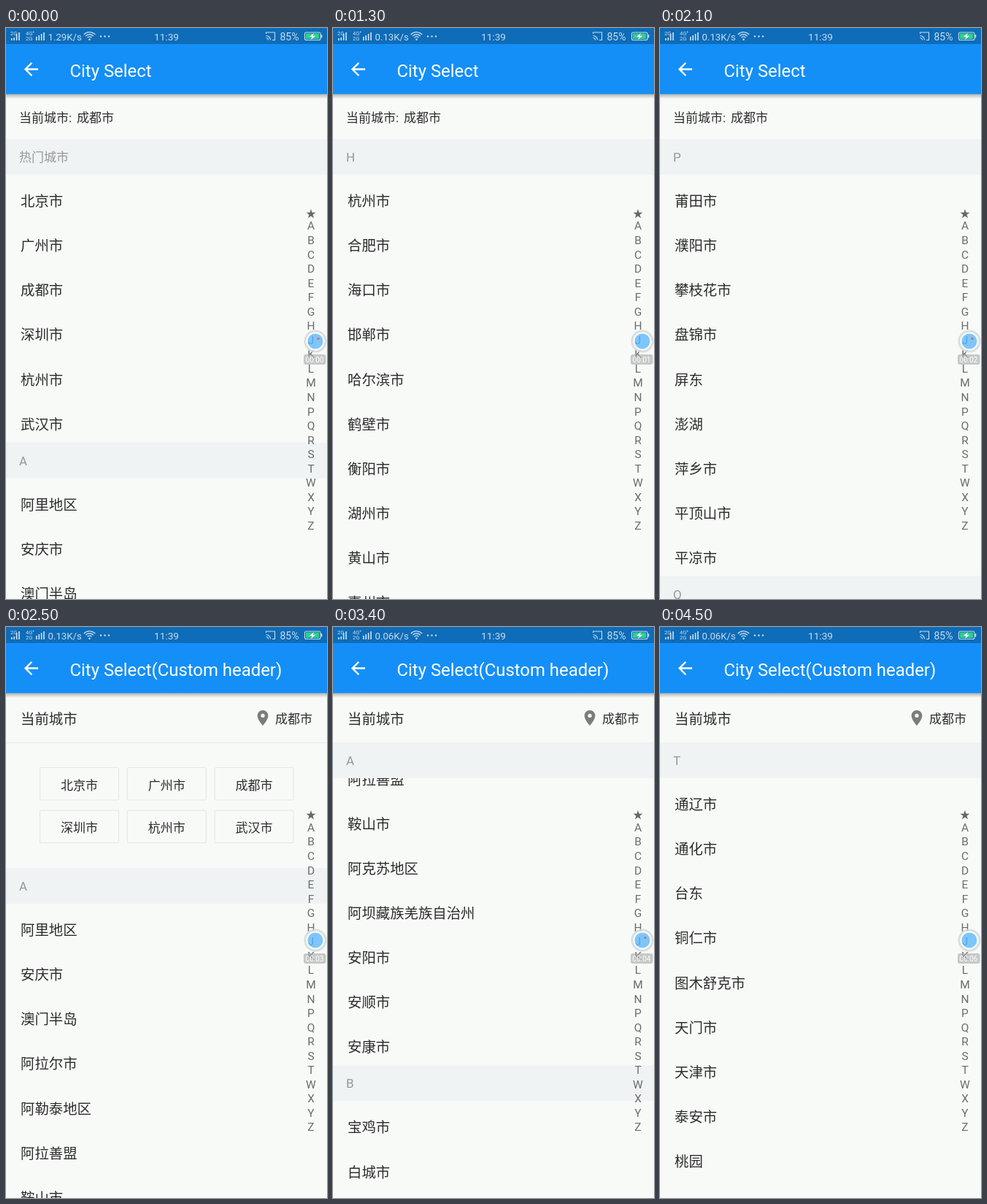
Animation of 440x782 px, one loop 4.6 s. Source, as an HTML page with a canvas:

```html
<!DOCTYPE html>
<html lang="zh">
<head>
<meta charset="utf-8">
<style>
html, body { margin: 0; width: 100%; height: 100%; overflow: hidden; background: #f8faf8; }
canvas { display: block; }
</style>
</head>
<body>
<canvas id="stage" width="440" height="782"></canvas>
<script>
const c = document.getElementById('stage').getContext('2d');
const LOOP = 4600, STEP = 100, HEAD = 49, ROW = 61.1, GRID = 172;
const BG = '#f8faf8', INK = '#2c2c2c';

const sections = `★ 北京市 广州市 成都市 深圳市 杭州市 武汉市
A 阿里地区 安庆市 澳门半岛 阿拉尔市 阿勒泰地区 阿拉善盟 鞍山市 阿克苏地区 阿坝藏族羌族自治州 安阳市 安顺市 安康市
B 宝鸡市 白城市 百色市 白山市 保定市 蚌埠市 包头市 北海市 本溪市 滨州市 亳州市
C 长沙市 长春市 常州市 成都市 承德市 赤峰市 滁州市 潮州市 郴州市 沧州市
D 大连市 大庆市 大同市 丹东市 德阳市 德州市 东莞市 东营市 定西市 达州市
E 鄂尔多斯市 鄂州市 恩施土家族苗族自治州
F 福州市 佛山市 抚顺市 抚州市 阜新市 阜阳市 防城港市
G 广州市 广元市 广安市 贵阳市 贵港市 桂林市 赣州市 高雄市 固原市
H 杭州市 合肥市 海口市 邯郸市 哈尔滨市 鹤壁市 衡阳市 湖州市 黄山市 惠州市
J 济南市 吉林市 嘉兴市 江门市 金华市 锦州市 九江市 荆州市 揭阳市 焦作市
K 昆明市 开封市 克拉玛依市 喀什地区
L 兰州市 拉萨市 洛阳市 柳州市 乐山市 丽江市 连云港市 临沂市 六安市 龙岩市
M 绵阳市 眉山市 茂名市 梅州市 牡丹江市 马鞍山市 苗栗
N 南京市 南宁市 南昌市 南通市 南阳市 宁波市 宁德市 内江市 南投
P 莆田市 濮阳市 攀枝花市 盘锦市 屏东 澎湖 萍乡市 平顶山市 平凉市
Q 青岛市 泉州市 秦皇岛市 衢州市 清远市 曲靖市 钦州市 庆阳市 潜江市
R 日照市 日喀则市
S 上海市 深圳市 苏州市 沈阳市 石家庄市 绍兴市 汕头市 三亚市 韶关市 宿迁市
T 通辽市 通化市 台东 铜仁市 图木舒克市 天门市 天津市 泰安市 桃园 铜川市 唐山市 台州市
W 武汉市 无锡市 温州市 潍坊市 威海市 芜湖市 梧州市 渭南市 文山市 乌海市
X 西安市 厦门市 徐州市 襄阳市 咸阳市 湘潭市 新乡市 信阳市 孝感市 邢台市
Y 银川市 宜昌市 烟台市 扬州市 盐城市 岳阳市 宜宾市 玉林市 榆林市 运城市
Z 郑州市 珠海市 中山市 湛江市 肇庆市 株洲市 淄博市 张家口市 镇江市 遵义市`
  .split('\n').map(line => {
    const [key, ...cities] = line.split(' ');
    return { key, cities };
  });

const pinIcon = new Path2D('M12 2C8.13 2 5 5.13 5 9c0 5.25 7 13 7 13s7-7.75 7-13c0-3.87-3.13-7-7-7zm0 9.5a2.5 2.5 0 0 1 0-5 2.5 2.5 0 0 1 0 5z');
const backIcon = new Path2D('M20 11H7.83l5.59-5.59L12 4l-8 8 8 8 1.41-1.41L7.83 13H20v-2z');
const boltIcon = new Path2D('M422 7l-6 5h3.6l-1.4 4 6-5.2h-3.6z');

// cy is the optical middle of the glyphs
function text(str, x, cy, size, color = INK, align = 'left') {
  c.font = `400 ${size}px Roboto, "Noto Sans CJK SC", "Noto Sans CJK", sans-serif`;
  c.fillStyle = color;
  c.textAlign = align;
  c.fillText(str, x, cy + size * 0.37);
}

function rect(x, y, w, h, color) {
  c.fillStyle = color;
  c.fillRect(x, y, w, h);
}

function disc(x, y, r, color) {
  c.fillStyle = color;
  c.beginPath();
  c.arc(x, y, r, 0, 7);
  c.fill();
}

function ring(x, y, r, width, color) {
  c.strokeStyle = color;
  c.lineWidth = width;
  c.beginPath();
  c.arc(x, y, r, 0, 7);
  c.stroke();
}

function box(x, y, w, h, r) {
  c.beginPath();
  c.roundRect(x, y, w, h, r);
}

function icon(path, x, y, scale, color) {
  c.save();
  c.translate(x, y);
  c.scale(scale, scale);
  c.fillStyle = color;
  c.fill(path, 'evenodd');
  c.restore();
}

function ease(t, from, to) {
  const x = Math.min(1, Math.max(0, (t - from) / (to - from)));
  return x * x * (3 - 2 * x);
}

// Page layout: list top, its sections and their offsets
function makePage(custom) {
  const list = custom ? sections.slice(1) : sections;
  let y = custom ? GRID : 0;
  const tops = list.map(s => {
    const top = y;
    y += HEAD + s.cities.length * ROW;
    return top;
  });
  return { custom, list, tops, top: custom ? 158 : 152 };
}
const plainPage = makePage(false), customPage = makePage(true);

// Section under the finger while it slides along the index
function slide(page, t, from, to, first, last) {
  const find = key => page.list.findIndex(s => s.key === key);
  const a = find(first), b = find(last);
  const k = Math.min(1, (t - from) / (to - from));
  return page.tops[Math.round(a + (b - a) * k)];
}

function scrollAt(page, t) {
  if (page.custom)
    return t < 4000 ? 707 * ease(t, 2643, 3800) : slide(page, t, 4000, 4400, 'D', 'T');
  return t < 1000 ? 880 * ease(t, 100, 700) : slide(page, t, 1000, 1700, 'C', 'P');
}

function sectionHead(key, y) {
  rect(0, y, 440, HEAD, '#eff3f3');
  text(key === '★' ? '热门城市' : key, 18, y + 24.9, 17, '#999');
}

function drawGrid(y) {
  sections[0].cities.forEach((city, i) => {
    const x = 46 + i % 3 * 119.8, by = y + 34 + (i > 2) * 58.7;
    box(x + .5, by + .5, 108, 44.5, 2);
    c.strokeStyle = '#e6e9e7';
    c.lineWidth = 1.2;
    c.stroke();
    text(city, x + 54.5, by + 24.3, 17, INK, 'center');
  });
}

function drawList(page, scroll) {
  const { top, tops, list } = page;
  c.save();
  c.beginPath();
  c.rect(0, top, 440, 782 - top);
  c.clip();
  if (page.custom) drawGrid(top - scroll);
  list.forEach((s, i) => {
    const y = top + tops[i] - scroll;
    s.cities.forEach((city, j) => {
      const cy = y + HEAD + j * ROW + 36;
      if (cy > top - 20 && cy < 800) text(city, 20, cy, 19.4);
    });
    if (y > top - HEAD && y < 782) sectionHead(s.key, y);
  });
  if (page.custom) rect(0, top, 440, 1, '#e9ecea');
  // The pinned header is pushed out by the next one
  const at = tops.findLastIndex(y => y <= scroll);
  if (at >= 0) {
    const next = at + 1 < tops.length ? tops[at + 1] - scroll : HEAD;
    sectionHead(list[at].key, top + Math.min(0, next - HEAD));
  }
  c.restore();
}

function drawIndex(shift) {
  text('★', 418, 253.5 + shift, 14, '#666', 'center');
  sections.slice(1).forEach((s, i) =>
    text(s.key, 418, 270.7 + shift + i * 19.55, 15.5, '#6a6c6b', 'center'));
}

function bars(x, heights) {
  heights.forEach((h, i) => rect(x + i * 3.4, 17 - h, 1.6, h, '#cfe2f2'));
}

function drawStatus(speed) {
  const pale = '#c6dcee';
  rect(0, 0, 440, 22, '#0e6cb8');
  text('2G', 6, 7.5, 7.5, pale);
  bars(7, [3, 4, 9, 11]);
  text('4G⁺', 27, 7.5, 7.5, pale);
  text('2G', 27, 14.5, 7.5, pale);
  bars(41, [5, 7, 9, 11]);
  text(speed + 'K/s', 57.5, 12, 13.2, pale);
  c.strokeStyle = pale;
  c.lineWidth = 1.4;
  for (const r of [4, 7.2, 10.4]) {
    c.beginPath();
    c.arc(114.5, 16, r, -2.4, -.74);
    c.stroke();
  }
  disc(114.5, 15.8, 1.3, pale);
  for (const x of [130, 135.5, 141]) disc(x, 11.5, 1.2, pale);
  text('11:39', 220, 12.3, 13.7, pale, 'center');

  c.lineWidth = 1.1;
  c.beginPath();
  c.moveTo(356.5, 8);
  c.lineTo(356.5, 6);
  c.lineTo(368.5, 6);
  c.lineTo(368.5, 16.5);
  c.lineTo(365, 16.5);
  for (const r of [3, 6]) {
    c.moveTo(356.5, 16.5 - r);
    c.arc(356.5, 16.5, r, -Math.PI / 2, 0);
  }
  c.stroke();
  text('85%', 375.5, 12, 14, pale);

  box(409.5, 6, 21.5, 10.5, 2);
  c.stroke();
  rect(411, 7.5, 18, 7.5, '#2fd18b');
  rect(431.5, 9, 1.8, 4.5, pale);
  c.fillStyle = '#fff';
  c.fill(boltIcon);
}

function drawBar(title) {
  const shade = c.createLinearGradient(0, 90, 0, 97);
  shade.addColorStop(0, 'rgba(0,0,0,.3)');
  shade.addColorStop(1, 'rgba(0,0,0,0)');
  rect(0, 90, 440, 7, shade);
  rect(0, 22, 440, 68.5, '#148ff7');
  icon(backIcon, 20.1, 42.1, 1.2, '#fff');
  text(title, 87.5, 58, 23.9, '#fff');
}

function drawRecorder(t) {
  ring(424, 429, 14, 3, 'rgba(212,217,215,.85)');
  ring(424, 429, 11.5, 2.2, 'rgba(250,252,252,.9)');
  disc(424, 429, 10.5, 'rgba(84,180,255,.75)');
  if (t % 1600 < 800) disc(428, 425.5, 1.8, '#c8786c');
  box(408, 447, 30.5, 14, 3);
  c.fillStyle = 'rgba(165,168,167,.6)';
  c.fill();
  text('00:0' + Math.floor(t * 1.42 / 1000), 423, 454.3, 10, '#fff', 'center');
}

function draw(t) {
  const page = t < 2200 ? plainPage : customPage;
  rect(0, 0, 440, 782, BG);
  drawList(page, scrollAt(page, t));
  if (page.custom) {
    text('当前城市', 20, 126, 19.4);
    icon(pinIcon, 339.4, 112, 1.05, '#7a7d7b');
    text('成都市', 420, 126, 17, INK, 'right');
  } else {
    text('当前城市:', 18, 122.7, 17);
    text('成都市', 97, 122.7, 17);
  }
  drawIndex(page.custom ? 3.5 : 0);
  drawBar(page.custom ? 'City Select(Custom header)' : 'City Select');
  drawStatus(t < 1300 ? '1.29' : t < 3400 ? '0.13' : '0.06');
  drawRecorder(t);
}

const start = performance.now();
function tick() {
  const t = (performance.now() - start) % LOOP;
  draw(Math.floor(t / STEP) * STEP);
  requestAnimationFrame(tick);
}
tick();
</script>
</body>
</html>
```
